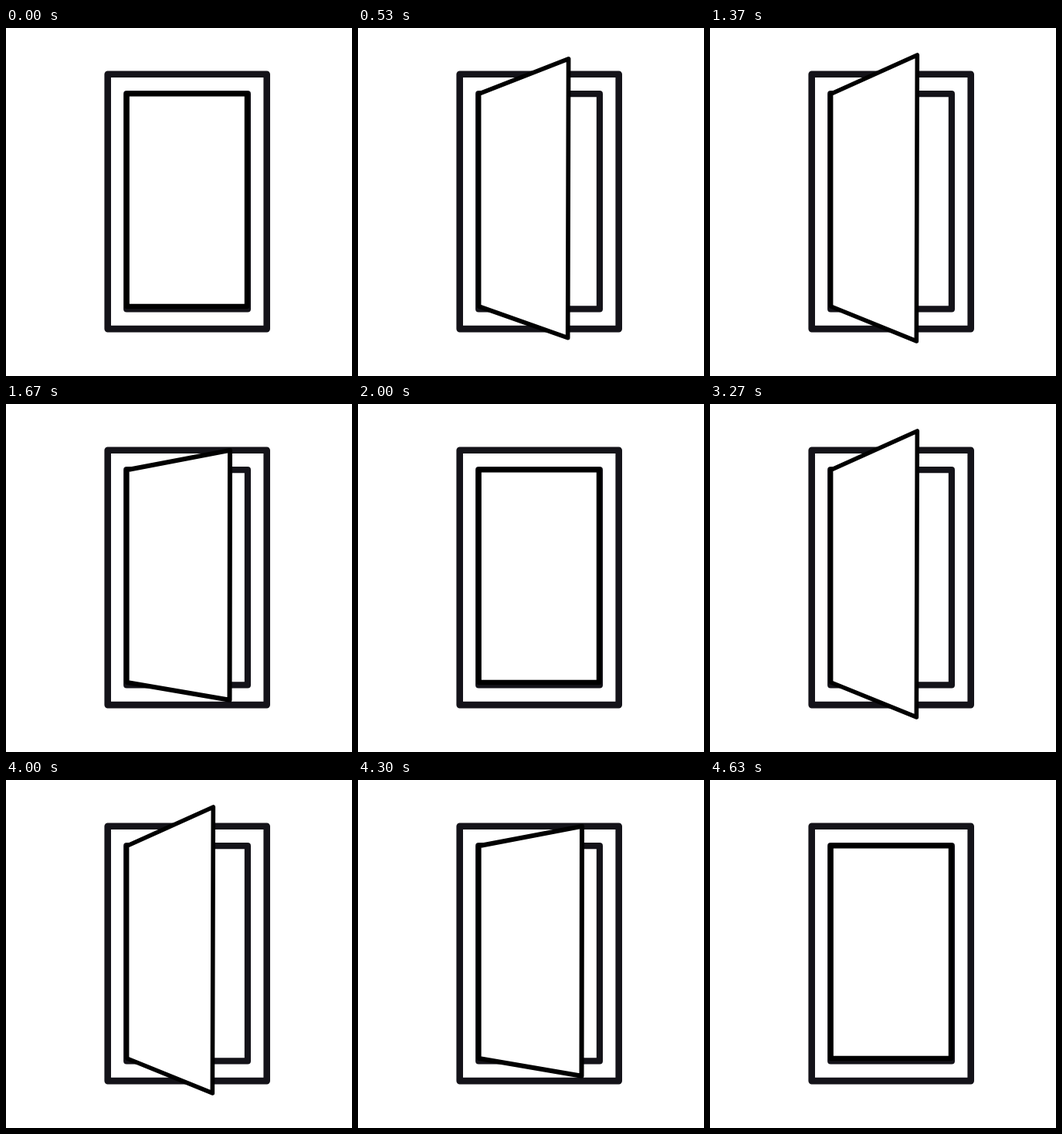
Animation of 448 by 450 pixels, one loop 4660 ms. Source, as an HTML page:

```html
<!DOCTYPE html>
<html lang="en">
<head>
<meta charset="utf-8">
<title>Door</title>
<style>
  html, body { margin: 0; width: 100%; height: 100%; overflow: hidden; background: #fff; }
  svg { display: block; width: 100%; height: 100%; }
</style>
</head>
<body>
<svg viewBox="0 0 448 450" stroke-linejoin="round">
  <g fill="none" stroke="#141319">
    <rect x="131.7" y="59.8" width="206" height="329.3" stroke-width="8.6"/>
    <rect x="156.2" y="85.2" width="156.7" height="278.2" stroke-width="8.2"/>
  </g>
  <path id="door" fill="#fff" stroke="#000"/>
</svg>
<script>
  const LOOP = 4660;
  const MOVE = 20; // ticks per swing, 30 ticks a second
  const OPEN_AT = [0, 79];
  const CLOSE_AT = [40, 119];
  const door = document.getElementById('door');

  const mix = (a, b, k) => a + (b - a) * k;
  const smooth = p => p * p * (3 - 2 * p);
  const swing = (tick, start) => smooth(Math.min(1, Math.max(0, (tick - start) / MOVE)));

  // Ticks fall on whole hundredths of a second: 0, 30, 70, 100 ms ...
  const tickAt = ms => Math.floor((3 * Math.floor(ms / 10) + 1) / 10);

  function openness(tick) {
    const sum = starts => starts.reduce((s, start) => s + swing(tick, start), 0);
    return sum(OPEN_AT) - sum(CLOSE_AT);
  }

  function draw(ms) {
    const k = openness(tickAt(ms % LOOP));
    const topRight = [mix(312, 268, k), mix(85.2, 34.6, k)];
    const bottomRight = [mix(312, 267, k), mix(360, 405.3, k)];
    door.setAttribute('d', `M156.6 85.2L${topRight}L${bottomRight}L156.6 360Z`);
    door.setAttribute('stroke-width', mix(6.5, 5.6, k));
  }

  const began = performance.now();
  function frame() {
    draw(performance.now() - began);
    requestAnimationFrame(frame);
  }
  frame();
</script>
</body>
</html>
```
